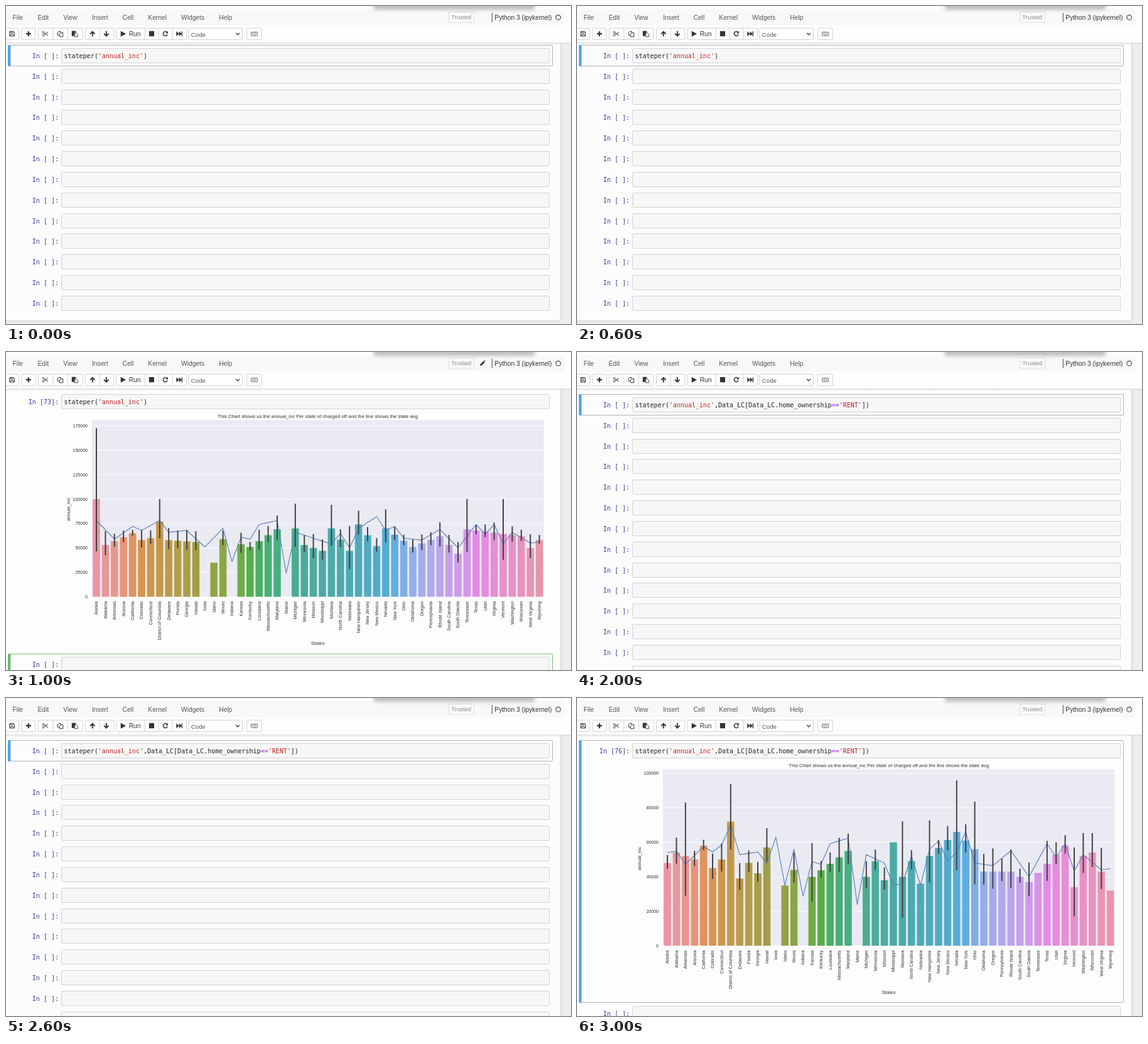
These frames come from a looping animation (900x506 px, 4000 ms). An HTML page:

```html
<!DOCTYPE html>
<html lang="en">
<head>
<meta charset="utf-8">
<title>Notebook charts</title>
<style>
html, body { margin: 0; width: 100%; height: 100%; overflow: hidden; background: #fff; }
svg { display: block; width: 900px; height: 506px; }
text { font-family: "Liberation Sans", Arial, sans-serif; white-space: pre; }
.mono { font: 10px "DejaVu Sans Mono", monospace; }
.popup { filter: drop-shadow(0 3px 3.5px rgba(0,0,0,.36)); }
</style>
</head>
<body>
<svg id="stage" viewBox="0 0 900 506" xmlns="http://www.w3.org/2000/svg">
  <defs>
    <linearGradient id="side"><stop offset="0" stop-color="#dcdcdc"/><stop offset="1" stop-color="#eee"/></linearGradient>
    <linearGradient id="under" x2="0" y2="1"><stop offset="0" stop-color="#dedede"/><stop offset="1" stop-color="#dedede" stop-opacity="0"/></linearGradient>
  </defs>
  <g id="scenes"></g>
  <g id="head"></g>
</svg>
<script>
const NS = 'http://www.w3.org/2000/svg';
const $ = id => document.getElementById(id);

function add(parent, tag, attrs = {}, content) {
  const el = document.createElementNS(NS, tag);
  for (const k in attrs) el.setAttribute(k, attrs[k]);
  if (content !== undefined) el.textContent = content;
  return parent.appendChild(el);
}
const rect = (p, x, y, width, height, fill, more) => add(p, 'rect', { x, y, width, height, fill, ...more });
const path = (p, d, stroke, width = 1, fill = 'none') => add(p, 'path', { d, stroke, 'stroke-width': width, fill });
const label = (p, x, y, str, size, fill = '#303030', more) => add(p, 'text', { x, y, 'font-size': size, fill, ...more }, str);

// ---------- chart data, in thousands ----------
const states = ('Alaska,Alabama,Arkansas,Arizona,California,Colorado,Connecticut,District of Columbia,Delaware,' +
  'Florida,Georgia,Hawaii,Iowa,Idaho,Illinois,Indiana,Kansas,Kentucky,Louisiana,Massachusetts,Maryland,Maine,' +
  'Michigan,Minnesota,Missouri,Mississippi,Montana,North Carolina,Nebraska,New Hampshire,New Jersey,New Mexico,' +
  'Nevada,New York,Ohio,Oklahoma,Oregon,Pennsylvania,Rhode Island,South Carolina,South Dakota,Tennessee,Texas,' +
  'Utah,Virginia,Vermont,Washington,Wisconsin,West Virginia,Wyoming').split(',');
const noBar = ['Iowa', 'Indiana', 'Maine'];

// Straight runs between key points {index: value}, one value per state.
function between(keys) {
  const at = Object.keys(keys).map(Number);
  return states.map((_, i) => {
    const b = at.find(k => k >= i), a = at.filter(k => k <= i).pop();
    return a === b ? keys[a] : keys[a] + (keys[b] - keys[a]) * (i - a) / (b - a);
  });
}
function seeded(seed) {
  return () => (seed = seed * 16807 % 2147483647) / 2147483647;
}
// Typical spread is small and random; a few states are far wider.
function spreads(seed, base, range, wide) {
  const rand = seeded(seed);
  return states.map((_, i) => {
    const usual = base + range * rand();
    return wide[i] ?? usual;
  });
}

const average = between({ 0: 78, 2: 59, 4: 72, 5: 68, 7: 78, 8: 66, 10: 68, 12: 51, 14: 70, 15: 36, 16: 61, 17: 59,
  18: 74, 20: 78, 21: 24, 22: 66, 26: 54, 27: 65, 28: 50, 29: 70, 31: 82, 32: 68, 33: 72, 34: 60, 36: 58, 38: 69,
  40: 50, 42: 74, 43: 64, 44: 74, 45: 54, 46: 66, 48: 55, 49: 56 });
const renters = { 0: 54, 7: 70, 12: 63, 13: 35, 21: 24, 25: 35, 26: 36, 28: 35, 31: 49, 33: 66 };

const all = {
  base: 389.5, top: 108.5, step: 25, unit: 1.5548, ticks: 8, line: average,
  bars: between({ 0: 100, 1: 53, 4: 65, 5: 58, 6: 60, 7: 77, 8: 58, 11: 56, 13: 35, 14: 59, 17: 51, 20: 69, 22: 70,
    23: 53, 25: 47, 26: 70, 28: 47, 29: 74, 31: 52, 32: 70, 35: 51, 38: 62, 40: 44, 41: 69, 47: 62, 48: 50, 49: 58 }),
  spread: spreads(7, 4, 9, { 0: 63, 4: 3, 7: 20, 13: 0, 22: 22, 26: 21, 28: 22, 32: 17, 41: 27, 45: 31 })
};
const rent = {
  base: 394.2, top: 113.5, step: 20, unit: 2.7435, ticks: 6, line: average.map((v, i) => renters[i] ?? v * 0.8),
  bars: between({ 0: 48, 1: 54, 3: 50, 4: 58, 5: 45, 6: 50, 7: 72, 8: 39, 9: 48, 10: 42, 11: 57, 13: 35, 14: 44,
    16: 40, 20: 55, 22: 40, 23: 49, 24: 38, 25: 60, 26: 40, 27: 49, 28: 36, 29: 52, 32: 66, 34: 56, 35: 43, 38: 43,
    40: 37, 44: 58, 45: 34, 46: 52, 47: 54, 49: 32 }),
  spread: spreads(11, 4, 8, { 2: 27, 4: 3, 7: 19, 13: 0, 16: 17, 25: 0, 26: 28, 28: 0, 29: 18, 32: 26, 34: 24,
    41: 0, 45: 20, 49: 0 })
};

// ---------- evenly spaced hues of equal lightness (LCh uv) ----------
function linearRgb(L, C, deg) {
  const a = deg * Math.PI / 180;
  const u = C * Math.cos(a) / (13 * L) + 0.19784, v = C * Math.sin(a) / (13 * L) + 0.46834;
  const Y = ((L + 16) / 116) ** 3, X = 9 * Y * u / (4 * v), Z = (9 * Y - 15 * v * Y - v * X) / (3 * v);
  return [3.2406 * X - 1.5372 * Y - 0.4986 * Z, -0.9689 * X + 1.8758 * Y + 0.0415 * Z,
    0.0557 * X - 0.204 * Y + 1.057 * Z];
}
function barColor(i) {
  const L = 69.3, hue = (i / states.length + 0.01) * 359;
  let lo = 0, hi = 250;
  for (let n = 0; n < 24; n++) {
    const mid = (lo + hi) / 2;
    if (linearRgb(L, mid, hue).every(c => c >= 0 && c <= 1)) lo = mid; else hi = mid;
  }
  const rgb = linearRgb(L, lo * 0.891, hue).map(c => c <= 0.0031308 ? 12.92 * c : 1.055 * c ** (1 / 2.4) - 0.055);
  const mean = (Math.max(...rgb) + Math.min(...rgb)) / 2;
  return `rgb(${rgb.map(c => Math.round(255 * (mean + (c - mean) * 0.75)))})`;
}

function chart(p, { base, top, step, unit, ticks, bars, spread, line }) {
  const left = 136.8, slot = 14.4, mid = i => left + slot * (i + 0.5), y = v => base - v * unit;
  const shown = states.map((s, i) => i).filter(i => !noBar.includes(states[i]));
  rect(p, left, top, 719.8, base - top, '#eaeaf2');
  for (let v = 0; v < ticks * step; v += step) {
    path(p, `M${left} ${y(v)}h719.8`, '#fff', 0.9);
    label(p, 130, y(v) + 2.5, v * 1000, 7.05, '#303030', { 'text-anchor': 'end' });
  }
  for (const i of shown) rect(p, mid(i) - 5.76, y(bars[i]), 11.52, bars[i] * unit, barColor(i));
  path(p, 'M' + line.map((v, i) => `${mid(i)} ${y(v)}`).join('L'), '#5580bb', 1.15).setAttribute('stroke-linejoin', 'round');
  for (const i of shown) path(p, `M${mid(i)} ${y(bars[i] + spread[i] * 1.15)}V${y(bars[i] - spread[i] * 0.85)}`, '#424242', 2);
  states.forEach((s, i) => label(p, 0, 0, s, 7.1, '#303030',
    { transform: `translate(${mid(i) + 2.4} ${base + 7.3}) rotate(-90)`, 'text-anchor': 'end' }));
  const center = { 'text-anchor': 'middle' };
  label(p, 496.6, top - 4, 'This Chart shows us the annual_inc Per state of charged off and the line shows the state avg', 7.77, '#303030', center);
  label(p, 496.6, base + 76.6, 'States', 7.7, '#303030', center);
  label(p, 0, 0, 'annual_inc', 7.7, '#303030', { ...center, transform: `translate(102 ${top + 142}) rotate(-90)` });
}

// ---------- notebook cells ----------
const plain = "stateper('annual_inc')";
const filtered = "stateper('annual_inc',Data_LC[Data_LC.home_ownership=='RENT'])";

function cell(p, y, num = ' ', code = '') {
  rect(p, 88.5, y - 11.5, 777, 23, '#f7f7f7', { stroke: '#cfcfcf', 'stroke-width': 0.9, rx: 1.6 });
  label(p, 84, y + 3.5, `In [${num}]:`, 10, '#303f9f', { class: 'mono', 'text-anchor': 'end' });
  const t = label(p, 92.5, y + 3.5, '', 10, '#222', { class: 'mono' });
  for (const part of code.split(/('[^']*'|==)/)) {
    const fill = part[0] === "'" ? '#ba2121' : part === '==' ? '#aa22ff' : '#222';
    add(t, 'tspan', { fill }, part);
  }
}
function frame(p, y, h, edge, bar) {
  rect(p, 3.5, y, 867, h, 'none', { stroke: edge, 'stroke-width': 0.9, rx: 1 });
  rect(p, 3, y, 4.2, h, bar);
}
function page(bottom, bg) {
  const g = add($('scenes'), 'g');
  rect(g, 0, 0, 900, 506, '#eee');
  rect(g, 882.5, 58, 5, bottom - 58, 'url(#side)');
  rect(g, 0, bottom, 883, 5, 'url(#under)');
  rect(g, 0, 0, 882.5, bottom, bg);
  return g;
}
function emptyList(y, bottom, count, code) {
  const g = page(bottom, '#fcfcfc');
  frame(g, y - 16.5, 33, '#ababab', '#42a5f5');
  for (let i = 0; i < count; i++) cell(g, Math.round(y + i * 32.82), ' ', i ? '' : code);
  return g;
}
function plotted(y, num, code, data, active) {
  const g = page(506, '#fdfdfd');
  if (active) frame(g, y - 16.5, 417, '#ababab', '#42a5f5');
  else frame(g, y + 401.5, 33, '#66bb6a', '#66bb6a');
  cell(g, y, num, code);
  chart(g, data);
  cell(g, y + 418);
  return g;
}
const scenes = [
  emptyList(79, 500, 13, plain),
  plotted(79, 73, plain, all, false),
  emptyList(84, 506, 14, filtered),
  plotted(84, 76, filtered, rent, true)
];

// ---------- menu and toolbar ----------
const head = $('head'), ink = '#333';
rect(head, 0, 0, 900, 58.5, '#fdfdfd');
rect(head, 0, 5, 889, 26, '#f8f8f8');
rect(head, 0, 58, 900, 4, 'url(#under)');
[['File', 10.5], ['Edit', 50.5], ['View', 91.3], ['Insert', 137], ['Cell', 185.5], ['Kernel', 226.3],
  ['Widgets', 279], ['Help', 339.3]].forEach(([s, x]) => label(head, x, 21.7, s, 10.25, '#555'));
rect(head, 705.5, 9.5, 40, 16.5, '#fafafa', { stroke: '#ddd' });
label(head, 709.3, 21.2, 'Trusted', 9.5, '#888');
path(head, 'M774.3 11V25.5', '#444');
label(head, 778.3, 21.7, 'Python 3 (ipykernel)', 10.25, ink);
add(head, 'circle', { cx: 879.6, cy: 18.2, r: 3.8, fill: 'none', stroke: '#444', 'stroke-width': 1.2 });
const pencil = path(head, 'M755 22l.6-2.6 5-5 2 2-5 5zM761.2 13.8l.8-.7 2 2-.8.7z', 'none', 0, ink);

const group = (x, w, ...splits) => {
  rect(head, x, 35.2, w, 18.3, '#fff', { stroke: '#ccc', 'stroke-width': 0.9, rx: 1.6 });
  splits.forEach(s => path(head, `M${s} 35.2v18.3`, '#ccc', 0.9));
};
group(-3, 23.5);
group(25, 21.7);
group(51.5, 70.5, 74.7, 98.3);
group(126.5, 45.2, 149.4);
group(176, 111.5, 221.2, 243.2, 265.2);
group(291, 85.5);
group(383.7, 23.6);

path(head, 'M5.8 40.5h6.2l1.6 1.6v5.8H5.8zM7.5 40.5v2.4h3.8v-2.4M7.5 47.9v-2.7h4.4v2.7', ink);
path(head, 'M35.8 40.2v8M31.8 44.2h8', ink, 2.2);
path(head, 'M60.5 42.6l6.5 4.4M60.5 45.8l6.5-4.4', '#555', 1.1);
for (const cy of [41.8, 46.6]) add(head, 'circle', { cx: 59.3, cy, r: 1.5, fill: 'none', stroke: '#555' });
path(head, 'M84.8 46.3H82v-3.4l2-2.4h3v2M85.3 44.8l2-2.2h3.4v6.2h-5.4z', ink, 1);
path(head, 'M105 40h6v2.2h-2.4v5.3H105z', ink, 0.6, ink);
path(head, 'M109.4 43h3l1.9 1.9v4h-4.9z', ink, 0.9, '#fff');
path(head, 'M137.8 48.6v-7.4M134 44.6l3.8-3.8 3.8 3.8', ink, 1.9);
path(head, 'M159.8 39.8v7.4M156 43.8l3.8 3.8 3.8-3.8', ink, 1.9);
path(head, 'M182.7 39.8l8.3 4.5-8.3 4.5z', 'none', 0, ink);
label(head, 195.7, 47.9, 'Run', 10.25, ink);
rect(head, 227.8, 40, 8.2, 8.2, ink);
path(head, 'M256.6 41.9a3.5 3.5 0 1 0 .6 3.3', ink, 1.5);
path(head, 'M258 39.8v3.8h-3.8z', 'none', 0, ink);
path(head, 'M271.3 40.2l4.3 4-4.3 4zM275.6 40.2l4.3 4-4.3 4zM279.7 40.2h1.3v8h-1.3z', 'none', 0, ink);
label(head, 294.8, 48.6, 'Code', 9.7, '#555');
path(head, 'M366.2 43l2.9 2.9 2.9-2.9', '#333', 1.3);
rect(head, 390.5, 41.6, 10.2, 5.6, 'none', { stroke: '#555', 'stroke-width': 0.9, rx: 0.6 });
path(head, 'M392 43.4h7.4M392.8 45.4h5.6', '#555', 0.9).setAttribute('stroke-dasharray', '1 .5');
rect(head, 586, -6, 256, 7.6, '#c4c4c4', { rx: 3, class: 'popup' });

// ---------- playback ----------
const hold = 1000;
function show() {
  const now = Math.floor(performance.now() / hold) % scenes.length;
  scenes.forEach((g, i) => g.setAttribute('display', i === now ? 'inline' : 'none'));
  pencil.setAttribute('display', now === 1 ? 'inline' : 'none');
  requestAnimationFrame(show);
}
show();
</script>
</body>
</html>
```
